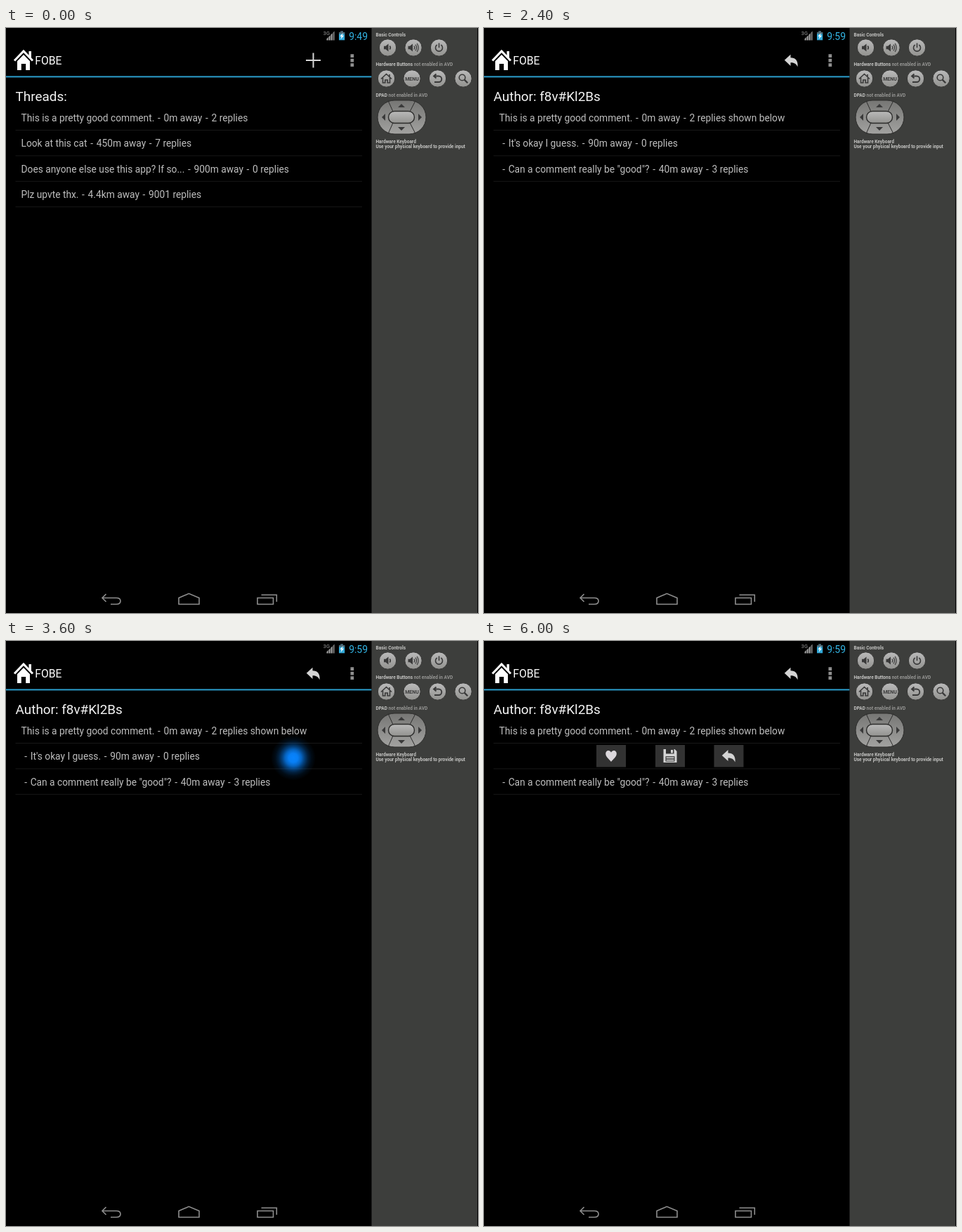
An HTML page for the animation above (7200 ms loop, 672 px wide and 833 px high).

```html
<!DOCTYPE html>
<html lang="en">
<head>
<meta charset="utf-8">
<title>Thread list demo</title>
<style>
  html, body { margin: 0; width: 100%; height: 100%; overflow: hidden; background: #000; }
  svg { display: block; width: 672px; height: 833px; font-family: Roboto, "Noto Sans", sans-serif; }
  .row { font-size: 13.78px; fill: #bebebe; white-space: pre; }
  .dash { letter-spacing: 1.25px; }
  .title { font-size: 18.9px; fill: #f3f3f3; }
  .divider { stroke: #181818; }
  .nav { fill: none; stroke: #8e8e8e; stroke-width: 1.6; }
  .note { font-size: 6.5px; font-weight: 700; fill: #969694; }
  .note tspan { fill: #c4c4c2; }
  .key { fill: url(#metal); stroke: #323231; stroke-width: 1; }
  .glyph { fill: none; stroke: #3a3a3a; stroke-width: 1.6; }
  .glyph .solid { fill: #3a3a3a; stroke: none; }
  .icon { fill: #d4d4d4; }
</style>
</head>
<body>
<svg viewBox="0 0 672 833">
  <defs>
    <radialGradient id="touch">
      <stop offset="0" stop-color="#0884ff"/>
      <stop offset=".2" stop-color="#0884ff" stop-opacity=".96"/>
      <stop offset=".36" stop-color="#0884ff" stop-opacity=".76"/>
      <stop offset=".5" stop-color="#0884ff" stop-opacity=".48"/>
      <stop offset=".65" stop-color="#0884ff" stop-opacity=".24"/>
      <stop offset=".8" stop-color="#0884ff" stop-opacity=".09"/>
      <stop offset="1" stop-color="#0884ff" stop-opacity="0"/>
    </radialGradient>
    <linearGradient id="metal" x2="0" y2="1">
      <stop offset="0" stop-color="#bababa"/>
      <stop offset="1" stop-color="#92928f"/>
    </linearGradient>
    <linearGradient id="pad" x2="0" y2="1">
      <stop offset="0" stop-color="#767674"/>
      <stop offset="1" stop-color="#a2a2a0"/>
    </linearGradient>
    <!-- icons are centred on their own origin -->
    <path id="reply" class="icon" d="M-9.7-.5L-1-8.6V-4C6-4 10 .5 9 9C7 4.5 3.5 3 -1 3V7.6Z"/>
    <path id="heart" fill="#dcd8dc" d="M0 8.5C-3 4.5-7.8 1.5-7.8-3C-7.8-8.5-1.7-9-0-4.7C1.7-9 7.8-8.5 7.8-3C7.8 1.5 3 4.5 0 8.5Z"/>
    <g id="save">
      <path class="icon" d="M-9.5-9.5H6.5L9.5-6.5V9.5H-9.5Z"/>
      <path fill="#303030" d="M-6-9.5H5.5V-3H-6ZM-6.5 .8H6.5V8H-6.5Z"/>
      <path class="icon" d="M1-8.5H4V-4H1ZM-5.5 2H5.5V3.8H-5.5ZM-5.5 5.2H5.5V7H-5.5Z"/>
    </g>
  </defs>

  <rect width="521" height="833"/>

  <!-- status bar -->
  <text x="451.8" y="10" font-size="7.3" fill="#999">3G</text>
  <path fill="#a4a4a4" d="M456.5 17.5V15.5L458.7 13V17.5ZM459.5 17.5V12.5L461.7 10.5V17.5ZM462.5 17.5V9.5L464.7 7.5V17.5Z"/>
  <path fill="#777" d="M465.5 17.5V6.5L467.7 4.5V17.5Z"/>
  <path fill="#33a9d8" d="M474 6H482.2V17.3H474Z"/>
  <path fill="#4d6b78" d="M474 6H476.2V4.2H480V6H482.2V8.5H474Z"/>
  <path fill="#fff" d="M479.8 7L475.4 12H477.7L476.6 16L481 10.7H478.6Z"/>
  <text id="clock" x="488.2" y="16.5" font-size="13.9" fill="#33b5e5"></text>

  <!-- action bar -->
  <g fill="#fff">
    <path d="M12 46.5L25 33L38 46.5" fill="none" stroke="#fff" stroke-width="3"/>
    <path d="M32.5 33H36V43L32.5 39.5ZM25 38L34 47.3V60H28.2V51H21.8V60H16V47.3Z"/>
    <text x="41.3" y="52" font-size="15.7">FOBE</text>
  </g>
  <path fill="#8f8f8f" d="M490.5 37.2H495.2V41.9H490.5ZM490.5 43.7H495.2V48.4H490.5ZM490.5 50.2H495.2V54.9H490.5Z"/>
  <rect y="68.4" width="520.5" height="2" fill="#2c9fce"/>

  <!-- app screens -->
  <g id="screens"></g>

  <!-- navigation bar -->
  <g class="nav">
    <path d="M142.5 806L137 811.5L142.5 817M137 811.5H157Q163 811.5 163 816Q163 820.5 157 820.5H149"/>
    <path d="M246 811.5L260.3 805.3L275 811.5V820.5H246Z"/>
    <path d="M358 811.5H380.5V820.5H358ZM363.5 807.3H385.3V817"/>
  </g>

  <!-- emulator panel -->
  <rect x="520.5" width="150.5" height="833" fill="#3d3e3c"/>
  <g class="note">
    <text x="526.5" y="11.6"><tspan>Basic Controls</tspan></text>
    <text x="526.5" y="53.7"><tspan>Hardware Buttons</tspan> not enabled in AVD</text>
    <text x="526.5" y="98.1"><tspan>DPAD</tspan> not enabled in AVD</text>
    <text x="526.5" y="163.8"><tspan>Hardware Keyboard</tspan></text>
    <text x="526.5" y="171.2"><tspan>Use your physical keyboard to provide input</tspan></text>
  </g>
  <g id="keys"></g>
  <g stroke="#2c2c2b">
    <rect x="529" y="103" width="69" height="48" rx="24" fill="url(#pad)"/>
    <path d="M544 103.5L551 119H575L583 103.5M544 150.5L551 135H575L583 150.5" fill="none"/>
    <rect x="544.5" y="118.5" width="37" height="17" rx="8.5" fill="url(#metal)" stroke-width="1.4"/>
    <path d="M558 113L563 108L568 113ZM558 141L563 146L568 141ZM540 122L535 127L540 132ZM587 122L592 127L587 132Z" fill="#3a3a3a" stroke="none"/>
  </g>
</svg>

<script>
const STEP = 1200;
const CLOCKS = ["9:49", "9:50", "9:59", "9:59", "9:59", "9:59"];
const PITCH = 36.4;
const find = id => document.getElementById(id);

const title = text => `<text class="title" x="13.6" y="104.2">${text}</text>`;
const row = (i, text, dx = 0) =>
  `<text class="row" x="${21.5 + dx}" y="${132.8 + i * PITCH}">${
    text.replaceAll(" -", `<tspan class="dash"> -</tspan>`)}</text>`;
const dividers = n => Array.from({ length: n }, (_, i) =>
  `<path class="divider" d="M13.5 ${145.5 + i * PITCH}H507"/>`).join("");
const icon = (name, x, y) => `<use href="#${name}" x="${x}" y="${y}"/>`;
const button = (name, x, y = 148, h = 31.5) =>
  `<rect x="${x}" y="${y}" width="42" height="${h}" fill="#323232"/>` + icon(name, x + 21, 163.5);
const touch = x => `<circle cx="${x}" cy="166.5" r="32" fill="url(#touch)"/>`;

const threads = highlight =>
  title("Threads:") + dividers(4) +
  `<path d="M427 46H448M437.5 35.5V56.5" stroke="#d6d6d6" stroke-width="2"/>` +
  (highlight ? `<rect x="13.5" y="109.5" width="493.5" height="36" fill="#0b698b"/>` : "") +
  row(0, "This is a pretty good comment. - 0m away - 2 replies") +
  row(1, "Look at this cat - 450m away - 7 replies") +
  row(2, "Does anyone else use this app? If so... - 900m away - 0 replies") +
  row(3, "Plz upvte thx. - 4.4km away - 9001 replies");

const detail = middle =>
  title("Author: f8v#Kl2Bs") + dividers(3) + icon("reply", 437.5, 46.3) +
  row(0, "This is a pretty good comment. - 0m away - 2 replies shown below") +
  middle +
  row(2, ` - Can a comment really be "good"? - 40m away - 3 replies`);

const answer = dx => row(1, " - It's okay I guess. - 90m away - 0 replies", dx);

const SCREENS = [
  threads(false),
  threads(true),
  detail(answer(0)),
  detail(answer(0) + touch(409)),
  detail(answer(-174.5) + button("heart", 449, 146.5, 35) + touch(251)),
  detail(button("heart", 160) + button("save", 244) + button("reply", 327.5)),
];

const speaker = `<path class="solid" d="M-5.5-2.3H-3L1-5.5V5.5L-3 2.3H-5.5Z"/>`;
const KEYS = [
  [543.5, 28, speaker + `<path d="M2.8-2.5Q4.8 0 2.8 2.5"/>`],
  [580, 28, `<g transform="translate(-2 0)">${speaker}<path d="M2.8-2.5Q4.8 0 2.8 2.5M5-4.3Q8 0 5 4.3M7.2-6Q11 0 7.2 6" stroke-width="1.2"/></g>`],
  [616.5, 28, `<path d="M-2.8-4A5 5 0 1 0 2.8-4M0-6.5V0"/>`],
  [541.5, 72, `<path d="M-7.5 .5L0-6.5L7.5 .5M-5-1V6H-1.7V2H1.7V6H5V-1M4.5-6V-2.5"/>`],
  [578, 72, `<text class="solid" y="2.6" text-anchor="middle" font-size="7" font-weight="700">MENU</text>`],
  [614.5, 72, `<path d="M-2-6.5L-5.5-3.5L-2-.5M-5.5-3.5H1.5A4.2 4.2 0 0 1 1.5 5H-4.5" stroke-width="1.9"/>`],
  [651, 72, `<circle cx="-1.5" cy="-1.5" r="4.3"/><path d="M1.6 1.6L6.2 6.2" stroke-width="2.3"/>`],
];

find("keys").innerHTML = KEYS.map(([x, y, glyph]) =>
  `<g class="glyph" transform="translate(${x} ${y})"><circle class="key" r="12.2"/>${glyph}</g>`).join("");
find("screens").innerHTML = SCREENS.map(s => `<g visibility="hidden">${s}</g>`).join("");

const groups = [...find("screens").children];
let shown = -1;

function show(step) {
  if (step === shown) return;
  groups.forEach((g, i) => g.setAttribute("visibility", i === step ? "visible" : "hidden"));
  find("clock").textContent = CLOCKS[step];
  shown = step;
}

const start = performance.now();
function tick() {
  show(Math.floor((performance.now() - start) / STEP) % SCREENS.length);
  requestAnimationFrame(tick);
}
tick();
</script>
</body>
</html>
```
